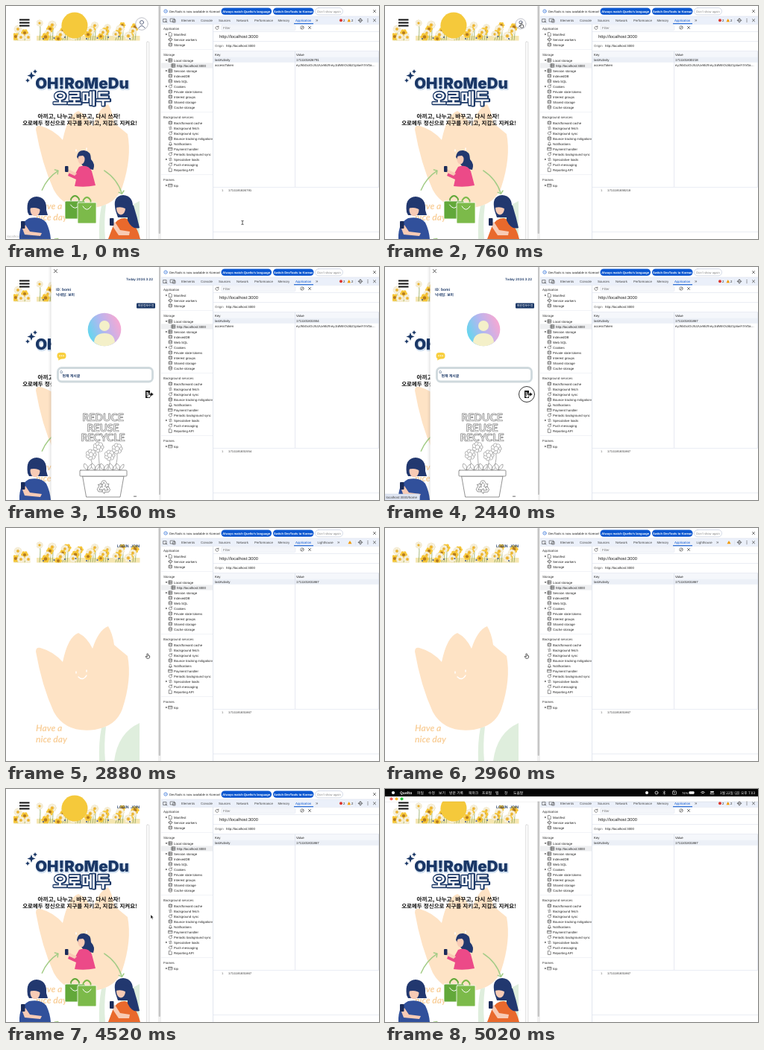
Recreate the animation shown at these times as an HTML page with a canvas. Size 500x313 px, loop 5.08 s.

```html
<!DOCTYPE html>
<html lang="ko">
<head>
<meta charset="utf-8">
<style>
html, body { margin: 0; width: 100%; height: 100%; overflow: hidden; background: #fff }
canvas { display: block; width: 500px; height: 313px }
</style>
</head>
<body>
<canvas id="stage"></canvas>
<script>
const LOOP = 5080, STEP = 40;
const SANS = '"Liberation Sans", Arial, sans-serif';
const KR = '"Noto Sans CJK KR", "Noto Sans CJK", "Noto Sans", sans-serif';
const MONO = '"Liberation Mono", monospace';
const NAVY = '#1a3766', INK = '#222', LINE = '#d5dbe8';
const cv = document.getElementById('stage'), dpr = window.devicePixelRatio || 1;
cv.width = 500 * dpr; cv.height = 313 * dpr;
const c = cv.getContext('2d');
c.scale(dpr, dpr);
c.lineJoin = c.lineCap = 'round';
c.textRendering = 'geometricPrecision';

const clamp = v => Math.max(0, Math.min(1, v));
const ramp = (t, a, b) => clamp((t - a) / (b - a));
const ease = p => p * p * (3 - 2 * p);

// y is the vertical middle of the line
function text(s, x, y, size = 4.35, color = INK, weight = 400, font = SANS, align = 'left') {
  c.font = `${weight} ${size}px ${font}`;
  c.fillStyle = color;
  c.textAlign = align;
  c.fillText(s, x, y + size * .36);
}
function rect(x, y, w, h, color) { c.fillStyle = color; c.fillRect(x, y, w, h); }
function round(x, y, w, h, r, fill, stroke, lw) {
  c.beginPath(); c.roundRect(x, y, w, h, r); paint(fill, stroke, lw);
}
function paint(fill, stroke, lw = .6) {
  if (fill) { c.fillStyle = fill; c.fill(); }
  if (stroke) { c.strokeStyle = stroke; c.lineWidth = lw; c.stroke(); }
}
function oval(x, y, rx, ry, fill, stroke, lw) {
  c.beginPath(); c.ellipse(x, y, rx, ry, 0, 0, 7); paint(fill, stroke, lw);
}
const dot = (x, y, r, fill, stroke, lw) => oval(x, y, r, r, fill, stroke, lw);
function path(d, fill, stroke, lw, x = 0, y = 0, s = 1) {
  c.save(); c.translate(x, y); c.scale(s, s);
  const p = new Path2D(d);
  if (fill) { c.fillStyle = fill; c.fill(p); }
  if (stroke) { c.strokeStyle = stroke; c.lineWidth = lw || .6; c.stroke(p); }
  c.restore();
}
function fade(a, draw) {
  if (a <= 0) return;
  c.save(); c.globalAlpha = a; draw(); c.restore();
}
const cross = (x, y, r = 1.6, col = '#444') =>
  path(`M${-r} ${-r}L${r} ${r}M${r} ${-r}L${-r} ${r}`, null, col, .7, x, y);

/* ---------- left page ---------- */
function flower(x, y, r, petal, heart, n = 8, edge) {
  for (let i = 0; i < n; i++) {
    const a = i * 2 * Math.PI / n;
    dot(x + Math.cos(a) * r * .62, y + Math.sin(a) * r * .62, r * .4, petal, edge, .5);
  }
  dot(x, y, r * .42, heart, edge, .5);
}
// tall blooms first, so the low ones overlap them
const BLOOMS = Array.from({ length: 30 }, (_, i) => ({
  x: 45 + i * 37 % 131, y: 23 + i * .62 + i * 7 % 4, r: 4.3 + i * 5 % 3 * .6, gold: i % 2
}));
function bloom({ x, y, r, gold }) {
  path(`M${x} ${y}Q${x + 2} ${y + 4} ${x} 46`, null, '#8fa65c', .8);
  gold ? flower(x, y, r, '#f6c638', '#b57a1e', 6) : flower(x, y, r, '#faf4e0', '#eeb22a', 8, '#e8dcb8');
}
function meadow() {
  c.save();
  c.beginPath(); c.rect(10, 9, 22.5, 37.5); c.rect(41, 9, 138.5, 37.5); c.clip();
  rect(10, 40, 170, 7, '#f5e6b0');
  [[16, 31, 0], [25, 36, 1], [13, 41, 1], [20, 42, 0], [30, 42, 0]].forEach(([x, y, gold]) => bloom({ x, y, r: 5, gold }));
  BLOOMS.forEach(bloom);
  for (let i = 0; i < 9; i++) dot(50 + i * 14.5, 44 - i * 5 % 4, 1.1, '#4a6093');
  c.restore();
}
function tulip() {
  path('M125 313Q124 288 128 268L134 267Q131 290 133 313ZM145 313Q150 275 179 262V313Z', '#dfeedd');
  path('M40 166Q40 160 46 161Q64 166 76 180Q83 146 97 141Q109 147 116 162Q124 137 137 132Q143 142 145 157Q152 163 163 172Q169 203 156 243Q148 266 119 271Q80 276 64 247Q48 212 40 166Z', '#fee3c5');
  path('M94 193v2M108 191v2M97 200Q103 206 108 198', null, '#fff', 1.4);
  const pen = '"Lato", sans-serif';
  text('Have a', 40, 269, 12, '#f9d09c', 'italic 700', pen);
  text('nice day', 40, 284, 12, '#f9d09c', 'italic 700', pen);
}
function hamburger() {
  for (let i = 0; i < 3; i++) rect(18, 17.5 + i * 4, 13.5, 2, '#111');
}
function arc(from, to) {
  const X = 101, Y = 269, R = 57;
  c.beginPath(); c.arc(X, Y, R, from, to); paint(null, '#a3cc86', 1.5);
  c.save();
  c.translate(X + R * Math.cos(to), Y + R * Math.sin(to));
  c.rotate(to);
  path('M-3.5 -3L0 0L3.5 -3', null, '#a3cc86', 1.5);
  c.restore();
}
function bag(x, y, w, h, col) {
  path(`M${x + w * .3} ${y}v-3q${w * .2} -8 ${w * .4} 0v3`, null, col, 1.8);
  round(x, y, w, h, 1, col, '#fff', .8);
  path(`M${x + w * .28} ${y + 5}q${w * .22} 9 ${w * .44} 0`, null, '#fff', 1);
}
function people() {
  const HAIR = '#22386f', SKIN = '#f8cbb5', PHONE = '#1b2c5a';
  // top
  path('M95 203Q96 193 105 194Q114 195 114 206Q120 212 117 220L105 218Z', HAIR);
  oval(101, 206, 4.5, 6.5, SKIN);
  path('M95 202Q103 193 109 205L103 201Z', HAIR);
  path('M98 216Q110 212 115 222L120 241Q106 244 92 242L94 233L83 228L85 223L93 225Z', '#ec4a88');
  path('M92 228L81 223L83 219L95 225Z', SKIN);
  round(79, 215, 4.5, 8, 1, PHONE);
  // left
  path('M29 277Q26 257 41 256Q55 257 54 274L56 281L31 281Z', HAIR);
  oval(39, 274, 6.5, 8.5, SKIN);
  path('M31 272Q34 259 47 266L48 275Q41 269 31 272Z', HAIR);
  path('M18 313Q17 292 31 285Q47 282 54 291Q59 301 60 313Z', '#31509b');
  path('M25 307L22 299L26 294L32 303L48 305L46 309Z', SKIN);
  round(20, 289, 5.5, 10, 1, PHONE);
  // right
  path('M147 275Q142 255 157 254Q171 255 170 272L164 284H150Z', HAIR);
  oval(154, 272, 6, 8.5, SKIN);
  path('M147 271Q151 257 163 265L165 277Q159 268 147 271Z', HAIR);
  path('M137 313L143 297Q148 285 159 285Q173 287 180 313Z', '#e9692c');
  path('M163 265L171 268Q176 284 179 298Q169 301 163 288Z', HAIR);
  path('M145 299L141 293L146 290L153 301L166 303L165 308L151 308Z', SKIN);
  round(139, 285, 5.5, 10, 1, PHONE);
}
function hero() {
  path('M34 88l1.5 4l4 1.5l-4 1.5l-1.5 4l-1.5 -4l-4 -1.5l4 -1.5ZM39 85l1 2l2 1l-2 1l-1 2l-1 -2l-2 -1l2 -1ZM29 97l1 2l2 1l-2 1l-1 2l-1 -2l-2 -1l2 -1Z', NAVY);
  c.textAlign = 'center';
  c.font = '900 20.5px Inter, sans-serif';
  c.strokeStyle = '#cfdeee'; c.lineWidth = 2;
  c.strokeText('OH!RoMeDu', 102.7, 111.7);
  text('OH!RoMeDu', 102, 103.5, 20.5, NAVY, 900, 'Inter, sans-serif', 'center');
  c.font = `900 21px ${KR}`;
  c.strokeStyle = NAVY; c.lineWidth = 3.4;
  c.strokeText('오로메두', 101.8, 132.4);
  text('오로메두', 101.3, 124.4, 21, '#fff', 900, KR, 'center');
  text('아끼고, 나누고, 바꾸고, 다시 쓰자!', 98, 148, 7.7, '#111', 900, KR, 'center');
  text('오로메두 정신으로 지구를 지키고, 지갑도 지켜요!', 99, 157, 7.5, '#111', 900, KR, 'center');
  arc(-2.75, -2.15); arc(-1, -.3); arc(1.75, 2.25);
  bag(79, 262, 27, 24, '#62a83a');
  bag(96, 264, 25, 28, '#7cba4a');
  people();
}
function avatar(r) {
  dot(182, 24, r, '#fff', '#b9bcc4', .9);
  dot(182, 22, r * .3, null, '#3c4869', .8);
  path('M-4 4Q0 -2.5 4 4', null, '#3c4869', .8, 182, 25.5, r / 8);
}
function page(t) {
  const loggedIn = t < 2640, shown = loggedIn ? 1 : ease(ramp(t, 2960, 3320));
  rect(0, 0, 205, 313, '#fff');
  fade(loggedIn ? 1 : .35 + .65 * ramp(t, 2640, 2840), () => { tulip(); meadow(); });
  fade(shown, () => {
    hero(); hamburger();
    dot(92, 26, 17.5, '#f5c93b');
    round(188.5, 48, 3.5, 270, 1, '#fafafa', '#d2d2d2', .6);
  });
  if (loggedIn) avatar(t < 40 ? 8.3 : t < 80 ? 7.6 : 7);
  else {
    text('LOGIN', 149, 24, 5, NAVY, 600, 'Inter, sans-serif');
    text('JOIN', 167, 24, 5, NAVY, 600, 'Inter, sans-serif');
  }
  rect(204, 0, 4, 313, '#f1f1f1');
  round(204.6, 0, 2.4, 306, 1.2, '#c6c6c6');
}

/* ---------- profile drawer ---------- */
function poster() {
  const G = '#777';
  c.textAlign = 'center';
  c.font = '700 14px "Lato", sans-serif';
  c.strokeStyle = G; c.lineWidth = .7;
  ['REDUCE', 'REUSE', 'RECYCLE'].forEach((s, i) => c.strokeText(s, 130, 207 + i * 13.5));
  for (const [x, y, r] of [[114, 252, 7], [124, 242, 7], [139, 253, 7], [149, 244, 7]]) {
    path(`M${x} ${y + r}Q${x + 1} 265 ${130 + (x - 130) * .7} 273`, null, G);
    flower(x, y, r, '#fff', '#fff', 7, G);
  }
  for (const x of [109, 119, 131, 143, 152]) path(`M${x} 273q-7 -4 -4 -9q6 2 4 9q1 -7 6 -8q1 6 -6 8`, '#fff', G);
  path('M103 281H158L153 309H108Z', '#fff', G, .8);
  round(99, 273, 63, 8, 1, '#fff', G, .8);
  for (let i = 0; i < 3; i++) {
    c.save(); c.translate(131, 296); c.rotate(i * 2 * Math.PI / 3);
    path('M-4 -5L-1.5 -9H2L5 -4L7 -5L5.5 0L1 -1.5L3 -3L0 -7L-1.5 -3.5Z', '#fff', G, .7);
    c.restore();
  }
  text('"', 171, 309, 5, '#333', 700);
  text('"', 173, 309, 5, '#333', 700);
}
function drawer(x, hover) {
  c.save();
  c.beginPath(); c.rect(0, 0, 205, 313); c.clip();
  c.translate(x - 60, 0);
  c.shadowColor = 'rgba(0,0,0,.35)'; c.shadowBlur = 5 * dpr;
  rect(60.5, -5, 150, 325, '#fff');
  c.shadowColor = 'transparent';
  cross(66.5, 5.5, 2, '#111');
  text('Today 2024.3.22', 197, 16.5, 4.4, NAVY, 600, 'Inter, sans-serif', 'right');
  text('ID: bomi', 67, 30, 4.8, NAVY, 600, KR);
  text('닉네임: 보미', 67, 37, 4.8, NAVY, 600, KR);
  round(175, 48.5, 25, 7, 1, NAVY);
  text('회원정보수정', 187.5, 52, 3.9, '#fff', 500, KR, 'center');
  const g = c.createLinearGradient(112, 92, 152, 76);
  g.addColorStop(0, '#67d5ee'); g.addColorStop(.5, '#b7b5ef'); g.addColorStop(1, '#f4a9d4');
  dot(132, 84, 22.3, g);
  dot(132, 79, 7, '#f4f0c9');
  path('M118 101Q119 89 132 89Q145 89 146 101Q140 106.3 132 106.3Q124 106.3 118 101Z', '#f4f0c9');
  round(68.5, 115, 12, 8.5, 4, '#f8cf3f');
  path('M71 121L70 125.5L75 123Z', '#f8cf3f');
  for (const i of [-2.5, 0, 2.5]) dot(74.5 + i, 119.3, .8, '#fff');
  round(69.5, 135.5, 127, 18.5, 5, '#fff', '#cfd9dd', 2.8);
  path('M73 142v-2l1.2 -1l1.2 1v2Z', null, '#54708f');
  text('현재 게시글', 75.5, 146.3, 4.9, NAVY, 600, KR);
  if (hover) dot(190, 171, 10.5 * hover, '#fff', '#222', .9);
  path('M-5 -5H1V5H-5Z', '#111', null, 0, 192, 171);
  path('M188.5 167.5L191 169V176L188.5 174Z', '#fff');
  path('M191 170H194V168L198 171L194 174V172H191Z', '#111', '#fff', .5);
  poster();
  c.restore();
}

/* ---------- developer panel ---------- */
// [y, label, icon, arrow]; no icon marks a heading
const TREE = [[30, 'Application'], [38, 'Manifest', 'f', 1], [45, 'Service workers', 'g'], [52, 'Storage', 'd'],
  [65, 'Storage'], [73, 'Local storage', 't', 2], [80, 'http://localhost:3000', 't'], [87, 'Session storage', 't', 1],
  [94, 'IndexedDB', 'd'], [101, 'Web SQL', 'd'], [108, 'Cookies', 'o', 1], [115, 'Private state tokens', 'd'],
  [122, 'Interest groups', 'd'], [129, 'Shared storage', 'd'], [136, 'Cache storage', 'd'],
  [149, 'Background services'], [157, 'Back/forward cache', 'd'], [164, 'Background fetch', 'a'],
  [171, 'Background sync', 'o'], [178, 'Bounce tracking mitigations', 'd'], [185, 'Notifications', 'b'],
  [192, 'Payment handler', 'c'], [199, 'Periodic background sync', 'o'], [206, 'Speculative loads', 'a', 1],
  [213, 'Push messaging', 'o'], [220, 'Reporting API', 'f'], [233, 'Frames'], [241, 'top', 'c', 1]];
const ICONS = {
  d: 'M-2 -1.8Q0 -3 2 -1.8V1.8Q0 3 -2 1.8ZM-2 -1.5Q0 -.5 2 -1.5M-2 .3Q0 1.3 2 .3',
  t: 'M-2.2 -2.2H2.2V2.2H-2.2ZM-2.2 -.8H2.2M-2.2 .8H2.2M-.7 -2.2V2.2',
  f: 'M-1.7 -2.4H.6L1.8 -1.2V2.4H-1.7Z',
  g: 'M-2 0A2 2 0 1 0 2 0A2 2 0 1 0 -2 0M-.6 0H.6M0 -2.8V-2M0 2V2.8M-2.8 0H-2M2 0H2.8',
  o: 'M1.6 -1.4A2.1 2.1 0 1 0 2.1 .4M2 -2.4V-1.1H.7',
  a: 'M-2 -1H1.5L.3 -2M2 1H-1.5L-.3 2',
  b: 'M-2 1.6H2M-1.4 1.6V-.4Q0 -4 1.4 -.4V1.6M-.3 2.5H.3',
  c: 'M-2.4 -1.8H2.4V1.8H-2.4ZM-2.4 -.7H2.4'
};
const icon = (k, x, y) => path(ICONS[k], null, '#444', .6, x, y);

function infoBar() {
  rect(208, 0, 292, 14, '#fff');
  dot(214, 7, 2.2, null, '#0b57d0', .6);
  text('i', 214, 7.1, 3.4, '#0b57d0', 700, SANS, 'center');
  text('DevTools is now available in Korean!', 219, 7, 4.2);
  const pill = (x, w, s, fill, col) => {
    round(x, 2.5, w, 9.3, 4.6, fill, fill ? null : '#b9c3d8');
    text(s, x + w / 2, 7.1, 4.1, col, fill ? 600 : 400, SANS, 'center');
  };
  pill(288.5, 67.5, 'Always match Quelto\u2019s language', '#0b57d0', '#fff');
  pill(358, 54.5, 'Switch DevTools to Korean', '#0b57d0', '#fff');
  pill(414.5, 37, 'Don\u2019t show again', null, '#888');
  cross(494, 7);
}
function tabBar(plain) {
  rect(208, 14, 292, 10.5, '#ebf0fa');
  rect(208, 13.7, 292, .5, LINE);
  rect(208, 24.2, 292, .5, LINE);
  path('M211 17.5H215V21.5H211ZM213.5 20L216 22', null, '#444');
  path('M220.5 17H226V21H220.5ZM224 18.5H227V22H224Z', null, '#444');
  [['Elements', 235], ['Console', 261], ['Sources', 285], ['Network', 309], ['Performance', 333],
   ['Memory', 364.5]].forEach(([s, x]) => text(s, x, 19.3, 4.35, '#444'));
  text('Application', 388, 19.3, 4.35, '#0b57d0', 400);
  rect(386, 23.2, 26, 1.2, '#0b57d0');
  if (plain) {
    text('Lighthouse', 417.5, 19.3, 4.35, '#444');
    text('»', 444, 19, 6, '#444');
    path('M458.5 21.3L461 16.9L463.5 21.3Z', '#f29900');
  } else {
    text('»', 415, 19, 6, '#444');
    dot(449, 19.3, 2, '#dc362e'); text('2', 452, 19.4);
    path('M457.5 21.3L459.8 17.1L462 21.3Z', '#f29900'); text('2', 463, 19.4);
  }
  rect(468.5, 16.5, .5, 6, LINE);
  path(ICONS.g, null, '#444', .7, 475, 19.3);
  for (const y of [17.5, 19.3, 21.1]) dot(485, y, .55, '#444');
  cross(494, 19.3);
}
function sidebar() {
  rect(208, 24.7, 69.5, 289, '#fff');
  c.save(); c.beginPath(); c.rect(208, 24.7, 69, 289); c.clip();
  rect(208, 76.5, 69, 7, '#eeeff1');
  for (const y of [58.5, 142.5, 226.5]) rect(208, y, 69, .5, '#e3e7ef');
  for (const [y, s, k, arrow] of TREE) {
    const x = !k ? 211 : y == 80 ? 229 : 225;
    text(s, x, y, 4.35, k ? INK : '#333');
    if (k) icon(k, x - 4.6, y);
    if (arrow) path(arrow == 1 ? 'M-.8 -1.3L1.2 0L-.8 1.3Z' : 'M-1.3 -.8L0 1.2L1.3 -.8Z', '#444', null, 0, 215, y);
  }
  c.restore();
  rect(277.2, 24.7, .7, 289, LINE);
}
function storage(stamp, token) {
  rect(278, 24.7, 222, 289, '#fff');
  icon('o', 283, 29.3);
  round(288.5, 25.8, 99.5, 7, 1.5, '#f4f6fa', '#e0e5ee', .5);
  text('Filter', 291, 29.5, 4.35, '#777');
  dot(397, 29, 2.2, null, '#444');
  path('M395.5 30.5L398.5 27.5', null, '#444');
  cross(407, 29);
  text('http://localhost:3000', 286, 41, 5.8);
  text('Origin', 280, 53, 4.35, '#555');
  text('http://localhost:3000', 295, 53);
  for (const y of [34, 47, 60.5, 243, 303.5]) rect(278, y, 222, .5, LINE);
  rect(278, 61, 222, 7.5, '#f5f7fb');
  rect(278, 68.5, 222, 7.3, '#ecf0f7');
  rect(387.3, 61, .6, 182, LINE);
  rect(499, 61, .6, 182, LINE);
  text('Key', 280, 65); text('Value', 389, 65);
  text('lastActivity', 280, 72.2); text(stamp, 389, 72.2);
  if (token) {
    text('accessToken', 280, 79.3);
    text('eyJhbGciOiJIUzUxMiJ9.eyJzdWIiOiJib21pIiwiYXV0a…', 389, 79.3);
  }
  text('1', 289, 247.4, 4, '#666', 400, MONO);
  text(stamp, 298, 247.4, 4, INK, 400, MONO);
}

/* ---------- overlays ---------- */
function status(s, w, bg) {
  if (bg) round(-2, 305, w + 2, 10, 1.5, '#dfe5f2', '#c4cddd', .5);
  text(s, 1.5, 309.3, 4.5, '#444');
}
function menuBar(p) {
  c.save(); c.translate(0, -17 * (1 - p));
  rect(0, 16.6, 500, .8, 'rgba(0,0,0,.1)');
  rect(0, 9, 500, 7.7, '#fff');
  ['#fe5f57', '#febc2e', '#28c840'].forEach((col, i) => dot(8.5 + i * 7, 13.3, 2, col));
  rect(0, 0, 500, 10, '#050505');
  dot(11, 5, 2.1, '#fff');
  text('Quelto', 20, 5, 4.9, '#fff', 700, KR);
  [['파일', 43], ['수정', 58], ['보기', 72], ['방문 기록', 86], ['북마크', 112], ['프로필', 130], ['탭', 148],
   ['창', 160], ['도움말', 172]].forEach(([s, x]) => text(s, x, 5, 4.8, '#fff', 500, KR));
  dot(351, 5, 2, '#fff');
  dot(364, 5, 2, null, '#fff', .7);
  path('M373 3.7L375.6 6.3L374.3 7.4V2.6L375.6 3.7L373 6.3', null, '#fff', .5);
  round(385.5, 2.8, 5, 4.6, 1, null, '#fff', .6);
  text('A', 388, 5.1, 3.6, '#fff', 400, SANS, 'center');
  text('74%', 398, 5, 4.2, '#fff');
  round(407.5, 3.2, 7, 3.6, 1, '#fff');
  path('M423.6 4.4Q426 2 428.4 4.4M424.8 5.7Q426 4.7 427.2 5.7', null, '#fff', .8);
  round(436, 3, 5, 1.5, .7, '#fff'); round(436, 5.6, 5, 1.5, .7, null, '#fff', .5);
  text('3월 22일 (금) 오후 7:03', 496, 5, 4.7, '#fff', 500, KR, 'right');
  c.restore();
}
const TRACK = [[0, 317, 290], [440, 317, 290], [720, 183, 26], [1120, 183, 26], [1560, 191, 172],
  [3000, 190, 172], [3320, 194, 169], [4520, 194, 169], [4840, 226, -12], [LOOP, 226, -12]];
function cursor(t) {
  const i = TRACK.findIndex((k, n) => n && t <= k[0]);
  const [t0, x0, y0] = TRACK[i - 1], [t1, x1, y1] = TRACK[i];
  const p = ease(ramp(t, t0, t1)), x = x0 + (x1 - x0) * p, y = y0 + (y1 - y0) * p;
  if (t < 480) path('M-1.2 -2.6Q0 -2.6 0 -1.8Q0 -2.6 1.2 -2.6M0 -1.8V1.8M-1.2 2.6Q0 2.6 0 1.8Q0 2.6 1.2 2.6', null, '#222', .7, x, y + 1);
  else if (t >= 680 && t < 1160 || t >= 1520 && t < 3040)
    path('M-1 -3Q0 -4 .5 -2.8V-.8L2.6 -.2Q3 2.6 1.6 3.2H-1.2L-3 .6Q-2.4 -.2 -1 .8Z', '#fff', '#222', .7, x, y);
  else path('M0 0V5.2L1.3 4.1L2.2 6.1L3.1 5.7L2.2 3.7H3.8Z', '#111', '#fff', .4, x, y);
}
// the stamp follows pointer activity and rests between moves
function stampAt(t) {
  if (t < 440) return '1711101826791';
  const active = t > 960 && t < 1120 ? 960 : t;
  return '1711101' + Math.min(831867, Math.round(830218 + (active - 760) * 1.67));
}

function draw(t) {
  c.clearRect(0, 0, 500, 313);
  page(t);
  const open = ease(ramp(t, 800, 960)) * (1 - ease(ramp(t, 2480, 2640)));
  if (open) drawer(205 - 145 * open, ease(ramp(t, 1640, 1880)));
  infoBar();
  tabBar(t >= 2720 && t < 3160);
  sidebar();
  storage(stampAt(t), t < 2600);
  if (t < 80) fade(t < 40 ? .4 : .2, () => status('localhost:3000/mypage', 46));
  if (t < 2520) fade(ramp(t, 1680, 1800), () => status('localhost:3000/home', 46.5, true));
  const bar = ease(ramp(t, 4760, 5000));
  if (bar) menuBar(bar);
  cursor(t);
}
let start;
function tick(now) {
  start ??= now;
  draw(Math.floor((now - start) % LOOP / STEP) * STEP);
  requestAnimationFrame(tick);
}
requestAnimationFrame(tick);
</script>
</body>
</html>
```
